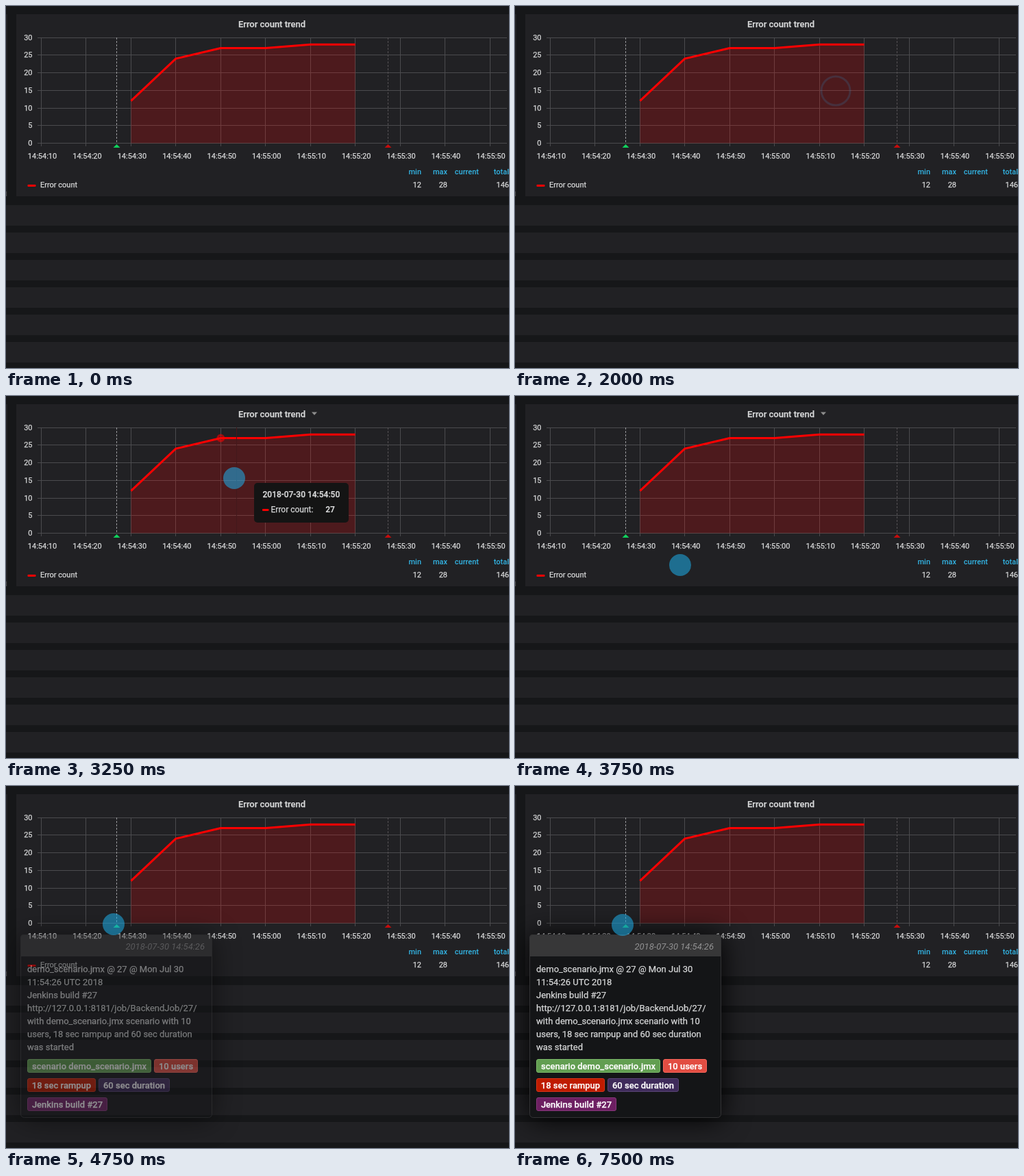
An HTML page for the animation above (8000 ms loop, 734x529 px).

```html
<!DOCTYPE html>
<html lang="en">
<head>
<meta charset="utf-8">
<title>Error count trend</title>
<style>
  html, body { margin: 0; width: 100%; height: 100%; overflow: hidden; background: #161719; }
  svg { display: block; width: 734px; height: 529px; }
  text { font: 400 11px Roboto, Arial, sans-serif; fill: #d8d9da; stroke: #d8d9da; stroke-width: .25px; white-space: pre; }
  .title { font-size: 13px; font-weight: 500; }
  .blue { fill: #33b5e5; stroke: none; font-weight: 500; }
  .tip { font-size: 12px; }
  .strong { font-size: 12px; font-weight: 500; }
  .value { font-size: 12px; font-weight: 700; stroke: none; }
  .date { font-size: 13px; font-style: italic; fill: #929293; stroke: none; }
  .body { font-size: 13px; }
  .tag { font-size: 13px; font-weight: 500; fill: #fff; stroke: #fff; }
  .shadow { filter: drop-shadow(0 2px 20px #000); }
</style>
</head>
<body>
<svg id="stage" viewBox="0 0 734 529" xmlns="http://www.w3.org/2000/svg"></svg>
<script>
const LOOP = 8000;
const stage = document.getElementById('stage');

function add(name, attrs, parent = stage) {
  const node = document.createElementNS(stage.namespaceURI, name);
  for (const key in attrs) node.setAttribute(key, attrs[key]);
  parent.appendChild(node);
  return node;
}
const rect = (x, y, width, height, fill, parent, more) =>
  add('rect', { x, y, width, height, fill, ...more }, parent);
const line = (x1, y1, x2, y2, stroke, parent, more) =>
  add('line', { x1, y1, x2, y2, stroke, ...more }, parent);
function label(str, x, y, cls = '', anchor = 'start', parent) {
  const node = add('text', { x, y, class: cls, 'text-anchor': anchor }, parent);
  node.textContent = str;
  return node;
}
const show = (node, on) => node.setAttribute('visibility', on ? 'visible' : 'hidden');

const PANEL = '#212124', GRID = '#4b4b4e', RED = '#ff0000';
const xAt = i => 51.5 + i * 65.45;
const yAt = v => 200.5 - v * 5.15;

// Panels
rect(0, 12, 2, 266, PANEL);
rect(0, 271, 1, 7, '#4a4a4c');
rect(15, 12, 719, 266, PANEL);
for (let i = 0; i < 6; i++) rect(0, 291 + i * 40, 734, 30, PANEL);

// Grid and axes
for (let v = 0; v <= 30; v += 5) {
  const y = Math.floor(yAt(v)) + .5;
  line(46, y, 731, y, GRID);
  label(v, 38.5, y + 3, '', 'end');
}
for (let i = 0; i <= 10; i++) {
  const x = Math.floor(xAt(i)) + .5;
  line(x, 46, x, 205, GRID);
  const sec = 10 + i * 10;
  const clock = `14:${54 + Math.floor(sec / 60)}:${String(sec % 60).padStart(2, '0')}`;
  label(clock, xAt(i) + 1.5, 223, '', 'middle');
}

// Series
const counts = [12, 24, 27, 27, 28, 28];
const pts = counts.map((v, i) => [xAt(i + 2), yAt(v)]);
add('polygon', { points: [...pts, [xAt(7), 200.5], [xAt(2), 200.5]].join(' '), fill: RED, 'fill-opacity': .2 });
add('polyline', { points: pts.join(' '), fill: 'none', stroke: RED, 'stroke-width': 3, 'stroke-linejoin': 'round' });

// Annotations
function marker(x, dash, fill) {
  line(x, 46, x, 201, dash, stage, { 'stroke-dasharray': '3 2' });
  add('polygon', { points: `${x - 5},207 ${x},202 ${x + 5},207`, fill });
}
marker(161.5, '#98989a', '#0fd15c');
marker(557.5, '#555054', '#c40d0d');

// Title and legend
label('Error count trend', 388, 31, 'title', 'middle');
const caret = add('polygon', { points: '446,23.5 454,23.5 450,28', fill: '#8e8e8e' });
rect(31.5, 261, 12, 3, RED, stage, { rx: 1 });
label('Error count', 50, 265);
[['min', 606, 12], ['max', 644, 28], ['current', 690, ''], ['total', 734, 146]].forEach(([name, x, v]) => {
  label(name, x, 246, 'blue', 'end');
  label(v, x, 265, '', 'end');
});

// Hover parts
const cross = line(0, 46, 0, 201, '#b80000');
const dot = add('circle', { r: 4.5, fill: RED, 'fill-opacity': .25, stroke: RED, 'stroke-width': 3, 'stroke-opacity': .5 });
const tip = add('g', {});
rect(0, 0, 138, 58, '#141414', tip, { rx: 5 });
const tipDate = label('', 12.5, 21, 'strong', 'start', tip);
rect(12, 38, 9.5, 3, RED, tip, { rx: 1 });
label('Error count:', 24.5, 43, 'tip', 'start', tip);
const tipValue = label('', 118, 43, 'value', 'end', tip);

// Annotation popover
const pop = add('g', {});
rect(21, 217, 280, 268, '#141517', pop, { rx: 5, class: 'shadow' });
add('path', { d: 'M21 249V222q0-5 5-5H296q5 0 5 5V249Z', fill: '#373738' }, pop);
rect(21.5, 217.5, 279, 267, 'none', pop, { rx: 5, stroke: '#333335' });
label('2018-07-30 14:54:26', 290, 239, 'date', 'end', pop);
[
  'demo_scenario.jmx @ 27 @ Mon Jul 30',
  '11:54:26 UTC 2018',
  'Jenkins build #27',
  'http://127.0.0.1:8181/job/BackendJob/27/',
  'with demo_scenario.jmx scenario with 10',
  'users, 18 sec rampup and 60 sec duration',
  'was started'
].forEach((str, i) => label(str, 31, 272 + i * 19, 'body', 'start', pop));
[
  ['scenario demo_scenario.jmx', 31, 399, 181, '#629e51', '#7bb96a'],
  ['10 users', 216, 399, 64, '#e24d42', '#fb665b'],
  ['18 sec rampup', 31, 427, 100, '#bf1b00', '#d83419'],
  ['60 sec duration', 135, 427, 104, '#3f2b5b', '#584474'],
  ['Jenkins build #27', 31, 455, 117, '#6d1f62', '#86387b']
].forEach(([str, x, y, w, fill, stroke]) => {
  rect(x + .5, y + .5, w - 1, 19, fill, pop, { rx: 2.5, stroke });
  label(str, x + w / 2, y + 15, 'tag', 'middle', pop);
});

// Pointer
const ball = add('circle', { r: 16, fill: '#1dafea', 'fill-opacity': .55 });
const ring = add('circle', { cx: 468, cy: 124, fill: 'none', stroke: '#2d8fc4', 'stroke-width': 3 });

// at: time, p: pointer, ring: [radius, opacity], tip: [x, y, axis index], pop: opacity
const steps = [
  { at: 0 },
  { at: 1000, p: [471, 75] },
  { at: 1250, p: [470, 102] },
  { at: 1500, ring: [19.5, .6] },
  { at: 1750, ring: [20.5, .38] },
  { at: 2000, ring: [21, .19] },
  { at: 2250, p: [446, 124], tip: [474, 131, 6] },
  { at: 2500, p: [431, 123], tip: [460, 130, 5], caret: 1 },
  { at: 2750, p: [352, 121], tip: [381, 128, 4], caret: 1 },
  { at: 3000, p: [334, 119], tip: [362, 127, 4], caret: 1 },
  { at: 3250, p: [333, 120], tip: [362, 127, 4], caret: 1 },
  { at: 3500, p: [288, 196], tip: [317, 204, 3], caret: 1 },
  { at: 3750, p: [241, 247], caret: 1 },
  { at: 4000, p: [194, 225], caret: 1 },
  { at: 4250, p: [156, 199], tip: [189, 204, 1], caret: 1 },
  { at: 4500, p: [157, 203], tip: [184, 212, 1], caret: 1 },
  { at: 4750, p: [157, 202], pop: .5 },
  { at: 5000, p: [157, 202], pop: 1 },
  { at: 5500, p: [157, 203], pop: 1 }
];

function draw(s) {
  show(caret, s.caret);
  show(ball, s.p);
  if (s.p) {
    ball.setAttribute('cx', s.p[0]);
    ball.setAttribute('cy', s.p[1]);
  }
  show(ring, s.ring);
  if (s.ring) {
    ring.setAttribute('r', s.ring[0]);
    ring.setAttribute('stroke-opacity', s.ring[1]);
  }
  show(pop, s.pop);
  pop.setAttribute('opacity', s.pop || 0);
  show(tip, s.tip);
  show(cross, s.tip);
  const point = s.tip && pts[s.tip[2] - 2];
  show(dot, point);
  if (s.tip) {
    const [x, y, i] = s.tip;
    const cx = x - 25.5;
    tip.setAttribute('transform', `translate(${x} ${y})`);
    tipDate.textContent = `2018-07-30 14:${i < 5 ? 54 : 55}:${(i + 1) % 6}0`;
    tipValue.textContent = point ? counts[i - 2] : '';
    cross.setAttribute('x1', cx);
    cross.setAttribute('x2', cx);
    cross.setAttribute('stroke', point ? '#43181b' : '#b80000');
  }
  if (point) {
    dot.setAttribute('cx', point[0]);
    dot.setAttribute('cy', point[1]);
  }
}

let last = null;
const start = performance.now();
function tick() {
  const t = (performance.now() - start) % LOOP;
  const now = steps.findLast(s => s.at <= t);
  if (now !== last) draw(last = now);
  requestAnimationFrame(tick);
}
tick();
</script>
</body>
</html>
```
